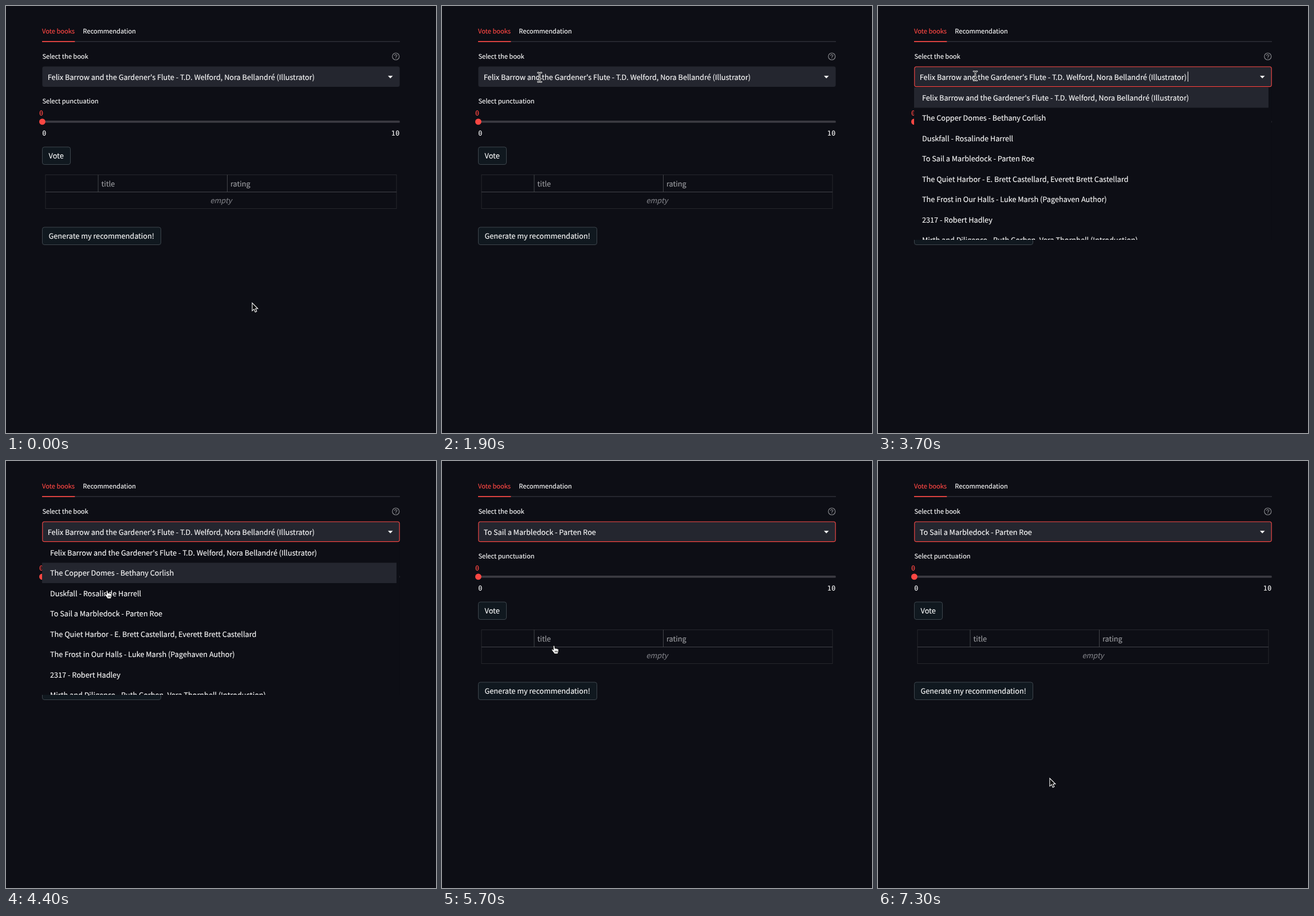
An HTML page that plays this animation: 751 px wide and 745 px high, repeating every 7590 ms.

```html
<!DOCTYPE html>
<html lang="en">
<head>
<meta charset="utf-8">
<title>Book voting</title>
<style>
  html, body { margin: 0; width: 100%; height: 100%; overflow: hidden; background: #0d0e15; }
  svg { display: block; width: 751px; height: 745px; color: #fafafa; }
  text {
    font: 12.69px "Noto Sans CJK JP", "Noto Sans CJK SC", "Noto Sans CJK KR", "Noto Sans CJK TC", "Noto Sans CJK", "Open Sans", sans-serif;
    fill: currentColor; stroke: currentColor; stroke-width: .15;
    text-rendering: geometricPrecision; white-space: pre;
  }
  .small { font-size: 11.11px; }
  .mono { font: 11.6px "DejaVu Sans Mono", "Noto Sans Mono", monospace; letter-spacing: .45px; }
  .red { color: #fa4743; }
  .accent { fill: #fa4743; }
  .head { color: #9b9ca0; }
  .empty { color: #7b7c82; font-style: italic; text-anchor: middle; }
  .button { fill: #10181f; stroke: #3d454c; }
  .outer { fill: none; stroke: #26272d; }
  .inner { fill: none; stroke: #43444a; }
  .panel { fill: #0d0e15; }
  .light { fill: #24262f; }
  #focus { fill: none; stroke: #fa4743; stroke-width: 1.1; }
</style>
</head>
<body>
<svg viewBox="0 0 751 745">
  <defs>
    <clipPath id="listClip"><rect x="63" y="141.5" width="624.5" height="266.5"/></clipPath>
    <path id="corner" d="M706.2 302v-5.3h5.3l-1.8 1.8 2.6 2.6-1.7 1.7-2.6-2.6z" fill="#b4b6b9"/>
    <path id="stem" d="M-3-8Q0-8 0-5.8Q0-8 3-8M0-6V6M-3 8Q0 8 0 5.8Q0 8 3 8M-2 2.5H2"/>
  </defs>

  <!-- tabs -->
  <text class="small red" x="63" y="48">Vote books</text>
  <text class="small" x="134.3" y="48">Recommendation</text>
  <rect x="63" y="61.2" width="625" height="1.7" fill="#2a2b33"/>
  <rect class="accent" x="63" y="61.2" width="57.3" height="1.7"/>

  <!-- book select -->
  <text class="small" x="63.4" y="92">Select the book</text>
  <g fill="none" stroke="#85868a" stroke-width="1.2" stroke-linecap="round">
    <circle cx="680.8" cy="88" r="6"/>
    <path d="M679 86.6c0-2.6 3.8-2.4 3.8 0 0 1.3-1.9 1.4-1.9 2.7M680.9 91.2v.1"/>
  </g>
  <rect class="light" x="63.4" y="105.6" width="624.2" height="35.4" rx="3.5"/>
  <rect id="focus" x="63.8" y="106" width="623.4" height="34.6" rx="3.2"/>
  <text id="value" x="72.8" y="128.6"></text>
  <rect id="caret" y="114.5" width="1" height="17.5" fill="#fafafa"/>
  <path d="M667 121.8h8.6l-4.3 4.4z" fill="#fafafa"/>

  <!-- slider -->
  <text class="small" x="63.4" y="170.2">Select punctuation</text>
  <text class="mono red" x="58" y="191.3">0</text>
  <rect x="63" y="200.1" width="624.8" height="3.6" rx="1.5" fill="#3a3a41"/>
  <circle class="accent" cx="63.4" cy="201.9" r="5.4"/>
  <text class="mono" x="63.3" y="226.3">0</text>
  <text class="mono" x="672.8" y="226.3">10</text>

  <!-- buttons and table -->
  <rect class="button" x="63.5" y="246" width="49" height="30.5" rx="3.5"/>
  <text x="74.6" y="266">Vote</text>
  <rect class="outer" x="69" y="294.5" width="613" height="59"/>
  <path class="inner" d="M69 324.5H682M161 294.5V324.5M386.5 294.5V324.5"/>
  <text class="head" x="166.4" y="314.8">title</text>
  <text class="head" x="392" y="314.8">rating</text>
  <text class="empty" x="375.5" y="344.2">empty</text>
  <rect class="button" x="63.5" y="386" width="207" height="30.5" rx="3.5"/>
  <text x="74.6" y="406">Generate my recommendation!</text>

  <g id="expand">
    <circle cx="712" cy="303.4" r="17.6" fill="#12171e"/>
    <use href="#corner"/>
    <use href="#corner" transform="rotate(180 712.5 303)"/>
  </g>

  <g id="list" clip-path="url(#listClip)">
    <rect class="panel" x="63" y="141.5" width="624.5" height="267"/>
  </g>

  <!-- pointers -->
  <g id="arrow">
    <path d="M0 0V13.8L3.2 10.9 5.3 15.9 7.8 14.8 5.7 10H9.8Z" fill="#000" stroke="#fff" stroke-width="1.1"/>
  </g>
  <g id="beam" fill="none" stroke-linecap="round">
    <use href="#stem" stroke="#fff" stroke-width="2.6"/>
    <use href="#stem" stroke="#111"/>
  </g>
  <g id="hand">
    <g transform="translate(-4.3 0)" stroke="#000" stroke-width=".8">
      <path d="M3 1.2C3-.4 5.4-.4 5.6 1.2L6 5C6.6 4 8 4.2 8.2 5.2 9 4.4 10.2 4.8 10.4 5.8 11.4 5.2 12.4 6 12.4 7.2 12.4 10.5 11.5 11.5 11 14H5C4.6 12 2 10 .6 7.6 0 6.4 1.4 5.6 2.4 6.4L3.6 7.6Z" fill="#fff"/>
      <path d="M6.3 8.6V11.6M8.2 8.6V11.6M10 8.6V11.6" fill="none"/>
    </g>
  </g>
</svg>

<script>
const LOOP = 7590, STEP = 100, ROW = 35.5, TOP = 142;
const books = [
  "Felix Barrow and the Gardener's Flute - T.D. Welford, Nora Bellandré (Illustrator)",
  "The Copper Domes - Bethany Corlish",
  "Duskfall - Rosalinde Harrell",
  "To Sail a Marbledock - Parten Roe",
  "The Quiet Harbor - E. Brett Castellard, Everett Brett Castellard",
  "The Frost in Our Halls - Luke Marsh (Pagehaven Author)",
  "2317 - Robert Hadley",
  "Mirth and Diligence - Ruth Corben, Vera Thornbell (Introduction)"
];

// time, x, y of the pointer's hot spot
const path = [
  [0, 430, 518], [200, 396, 458], [400, 396, 458], [500, 365, 435],
  [900, 205.5, 334.5], [1200, 188, 288], [1300, 176, 190], [1400, 171, 126],
  [1700, 171, 126], [2200, 170, 122], [3700, 170, 122], [4000, 174, 180],
  [4400, 176.5, 226], [4500, 176.5, 229], [4900, 176.5, 267],
  [5500, 176.5, 267], [5800, 205, 350], [6100, 278.5, 499],
  [6400, 301.5, 556], [6500, 301.5, 556], [6600, 300, 553.5]
];
const pointers = [[0, "arrow"], [1400, "beam"], [3900, "hand"], [6600, "arrow"]];
const focusFade = [[2900, 0], [3200, 1]];
const listFade = [[3100, 0], [3400, 1], [5300, 1], [5500, 0]];
const rowStarts = [3200, 4000, 4500, 4800];
const caretOn = [[3000, 3200], [3700, 4200], [4700, 5200], [6000, 7000]];

const $ = id => document.getElementById(id);
const within = (t, from, to) => t >= from && t < to;

function tween(table, t) {
  const next = table.findIndex(k => k[0] > t);
  if (next === 0) return table[0].slice(1);
  if (next < 0) return table[table.length - 1].slice(1);
  const a = table[next - 1], b = table[next];
  const p = (t - a[0]) / (b[0] - a[0]);
  return a.slice(1).map((v, i) => v + (b[i + 1] - v) * p);
}

function add(parent, tag, attrs, label = "") {
  const el = document.createElementNS("http://www.w3.org/2000/svg", tag);
  for (const key in attrs) el.setAttribute(key, attrs[key]);
  el.textContent = label;
  return parent.appendChild(el);
}

const lights = rowStarts.map((_, i) =>
  add($("list"), "rect", { class: "light", x: 63, y: TOP + i * ROW, width: 619, height: ROW }));
books.forEach((name, i) => add($("list"), "text", { x: 77, y: 164.5 + i * ROW }, name));

function rowLight(i, t) {
  const start = rowStarts[i], end = rowStarts[i + 1] ?? Infinity;
  if (t < start) return 0;
  if (t >= end) return Math.max(0, .5 - (t - end) / 250);
  return i && t < start + STEP ? .6 : 1;
}

function draw(time) {
  const t = Math.floor(time / STEP) * STEP;
  const voted = t >= 5400;
  const [x, y] = tween(path, t);
  const pointer = pointers.filter(p => p[0] <= t).pop()[1];

  for (const id of ["arrow", "beam", "hand"]) {
    $(id).style.display = id === pointer ? "" : "none";
  }
  $(pointer).setAttribute("transform", `translate(${x} ${y})`);

  $("value").textContent = books[voted ? 3 : 0];
  $("caret").setAttribute("x", voted ? 272.6 : 540.8);
  $("caret").style.opacity = caretOn.some(([a, b]) => within(t, a, b)) ? 1 : 0;
  $("focus").style.opacity = tween(focusFade, t)[0];
  $("list").style.opacity = tween(listFade, t)[0];
  $("expand").style.opacity = within(t, 800, 1300) ? 1 : 0;
  lights.forEach((el, i) => el.style.opacity = rowLight(i, t));
}

const start = performance.now();
function tick() {
  draw((performance.now() - start) % LOOP);
  requestAnimationFrame(tick);
}
tick();
</script>
</body>
</html>
```
